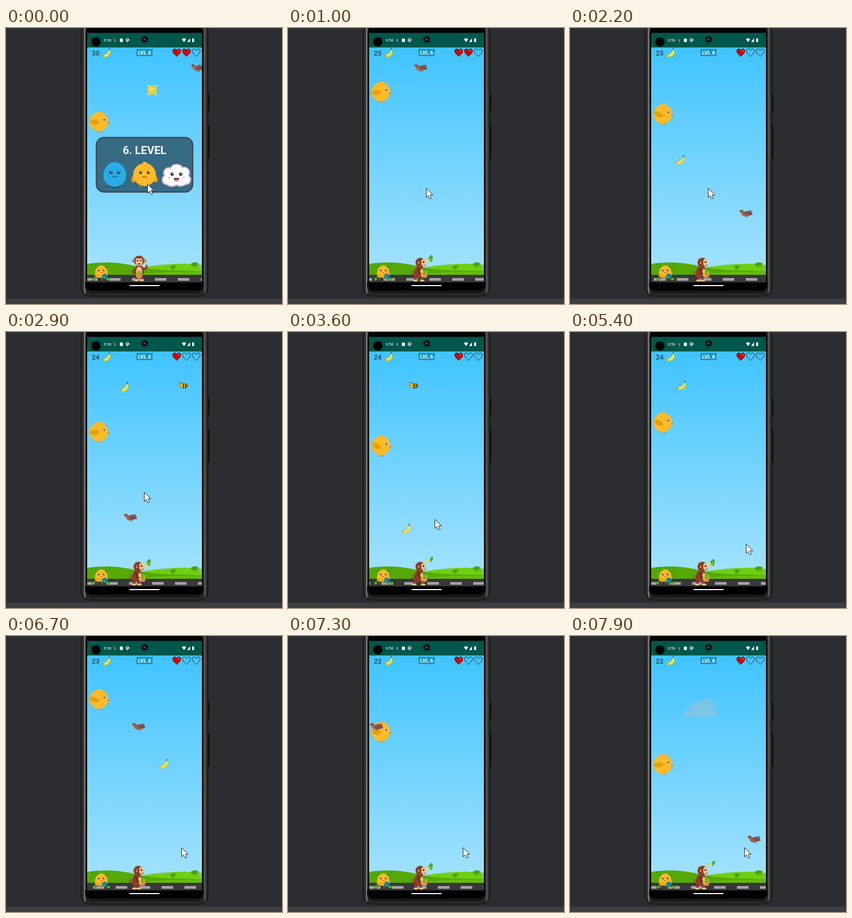
An HTML page with a canvas that plays this animation: 510x510 px, repeating every 8000 ms.

```html
<!DOCTYPE html>
<html lang="en">
<head>
<meta charset="utf-8">
<title>Banana run</title>
<style>
html, body { margin: 0; width: 100%; height: 100%; overflow: hidden; background: #2c2d30; }
canvas { display: block; width: 510px; height: 510px; }
</style>
</head>
<body>
<canvas id="stage"></canvas>
<script>
const LOOP = 8000, STEP = 100;
const canvas = document.getElementById('stage');
const c = canvas.getContext('2d');
const dpr = window.devicePixelRatio || 1;
canvas.width = canvas.height = 510 * dpr;

// ---- helpers ----
function paint(fill, stroke, w = 1) {
  if (fill) { c.fillStyle = fill; c.fill(); }
  if (stroke) { c.strokeStyle = stroke; c.lineWidth = w; c.stroke(); }
}
function oval(x, y, rx, ry, fill, stroke, w, rot = 0) {
  c.beginPath(); c.ellipse(x, y, rx, ry, rot, 0, 7); paint(fill, stroke, w);
}
const dot = (x, y, r, fill, stroke, w) => oval(x, y, r, r, fill, stroke, w);
function box(x, y, w, h, fill, r = 0, stroke, lw) {
  c.beginPath(); c.roundRect(x, y, w, h, r); paint(fill, stroke, lw);
}
function path(d, fill, stroke, w = 1) {
  const p = new Path2D(d);
  c.lineCap = c.lineJoin = 'round';
  if (fill) { c.fillStyle = fill; c.fill(p); }
  if (stroke) { c.strokeStyle = stroke; c.lineWidth = w; c.stroke(p); }
}
function text(s, x, y, size, fill, weight = 700, align = 'center') {
  c.font = `${weight} ${size}px Roboto, sans-serif`;
  c.textAlign = align; c.fillStyle = fill; c.fillText(s, x, y);
}
function at(x, y, draw, rot = 0, scale = 1, alpha = 1) {
  c.save(); c.translate(x, y); c.rotate(rot); c.scale(scale, scale);
  c.globalAlpha *= alpha; draw(); c.restore();
}
function fade(from, to, stops, vertical) {
  const g = vertical ? c.createLinearGradient(0, from, 0, to) : c.createLinearGradient(from, 0, to, 0);
  stops.forEach(([p, col]) => g.addColorStop(p, col));
  return g;
}
// Value of a track of [time, ...values] at time t, linear between keys.
function track(keys, t) {
  const i = keys.findIndex(k => k[0] > t);
  if (i < 0) return keys[keys.length - 1].slice(1);
  if (i === 0) return keys[0].slice(1);
  const a = keys[i - 1], b = keys[i], p = (t - a[0]) / (b[0] - a[0]);
  return a.slice(1).map((v, j) => v + (b[j + 1] - v) * p);
}
const stepped = (keys, t) => keys.filter(k => k[0] <= t).pop()[1];

// ---- timeline ----
const score = [[0, 30], [900, 25], [2700, 24], [6300, 23], [7300, 22]];
const lives = [[0, 2], [1600, 1]];
const chickY = [[0, 173], [200, 173], [1000, 118], [2200, 159], [3600, 210], [5400, 167], [6700, 117], [7900, 237]];
const cursorPos = [[0, 261, 288], [400, 261, 288], [800, 255, 296], [3000, 255, 296], [3600, 271, 346],
  [4000, 276, 350], [4500, 325, 392], [5500, 325, 392], [6700, 324, 391], [7900, 322, 391]];
// Falling bananas: start, end, x and y at both ends, tilt
const bananas = [
  [1810, 2700, 170, 98, 247, 431, 0],
  [2890, 3850, 219, 98, 219, 457, -.12],
  [5390, 6290, 206, 95, 247, 431, 0],
  [6330, 7230, 323, 98, 247, 435, -.12]
];
// Birds fly left: time and place of one known point
const birds = [[1000, 245, 73], [2200, 325, 342], [6700, 245, 167], [7900, 340, 375]];
const FLY = .136;

// ---- sprites ----
function banana() {
  path('M-8 3.5C-3 4 2.5 1 4.5-5L6.5-6C10 1 4 8-4 7.8C-7 7.4-8.5 6-8 3.5Z', '#fddc22', '#e0b010', .4);
  path('M-5 5C0 5 4.5 1.5 6-3', null, '#fff08a', 1);
  path('M5.5-5.5L6.2-8', null, '#55551c', 1.6);
  dot(-7.6, 5, .9, '#6b5a20');
}
function heart(full) {
  path('M0 7C-3 4-7.3 1-7.3-3C-7.3-8-1.5-8 0-4C1.5-8 7.3-8 7.3-3C7.3 1 3 4 0 7Z',
    full ? '#d80000' : null, full ? '#3d0505' : '#12303f', 1);
  if (full) oval(3.8, -3.6, 1.1, 1.5, '#ff6a60');
}
function face(eye, gap) {
  for (const s of [-1, 1]) {
    dot(s * gap, 0, eye, '#222');
    dot(s * gap + .6, -.8, eye * .38, '#fff');
  }
}
function chick(t) {
  const wing = Math.sin(t / 260) * .35;
  path('M-1 17L-2 19.5H0M4 17V19.5H6', null, '#d7831c', 1.1);
  path('M-2-17C0-20 3-20 4-18Q7-18 9-15Z', '#fcb826');
  oval(0, 0, 17.3, 17.7, '#fdba29');
  at(-7, 1, () => path('M-10-3C-5-7 5-5 9 1C5 6-8 7-10-3Z', '#e6a00f'), wing);
  dot(10, -3.5, 2.2, '#fff'); dot(10.2, -3.5, 1.7, '#222'); dot(10.7, -4.1, .6, '#fff');
  path('M16-1L19.5 2L16.5 5Z', '#e58a18');
}
function frontChick() {
  path('M-7 19L-10 24M-7 21L-6 25M7 19L6 24M8 21L11 24', null, '#c96516', 1.6);
  path('M-18-2C-24 3-26 10-23 14C-18 15-15 10-14 7ZM18-2C24 3 26 10 23 14C18 15 15 10 14 7Z', '#e9a010');
  path('M-4-19C-5-24 3-26 6-20Q13-20 11-15Z', '#fdba29');
  dot(0, 0, 21, '#fdba29');
  at(0, -4, () => face(2.5, 7));
  path('M-6 4Q0 0 6 4Q0 9-6 4Z', '#e28417');
}
function egg() {
  path('M-12 20Q-16 25-19 22M-10 21Q0 27 11 21', null, '#2d4550', 1.2);
  path('M0-23C12-23 21-11 21 1C21 15 11 22 0 22C-11 22-21 15-21 1C-21-11-12-23 0-23Z', '#27aee9');
  for (let i = 0; i < 26; i++) {
    const a = i * 2.4, r = 3.5 * Math.sqrt(i);
    dot(Math.cos(a) * r, Math.sin(a) * r, .7, '#1689bd');
  }
  at(0, -4, () => face(2.8, 7));
  path('M-4 3Q0 6 4 3', null, '#174d6a', 1.2);
}
function cloudFriend() {
  path('M-18 17C-27 16-29 5-22 1C-27-8-18-16-11-13C-7-22 7-22 11-14C20-17 27-7 22 1C29 6 26 17 17 17C10 22 4 20 0 18C-6 22-14 21-18 17Z',
    '#fff', '#d6b9dc', 2.4);
  at(0, -2, () => face(3, 8));
  oval(-13, 4, 3, 1.6, '#f7bfd0'); oval(13, 4, 3, 1.6, '#f7bfd0');
  path('M-5 5H5Q4 11 0 11Q-4 11-5 5Z', '#7c3246');
  oval(0, 9, 2.5, 1.5, '#ee7788');
}
function greyCloud() {
  path('M-25 18C-34 16-31 2-19 3C-18-9-5-14 4-11C9-22 24-18 23-5C32-2 34 15 24 17Z', '#a9bec5');
}
function bird(t) {
  const up = Math.floor(t / STEP) % 4 < 2;
  path('M4 1L12-1L11 1L13 3L4 5Z', '#7b4c48');
  path('M-13-3L-9.5-6C-7-7-5-5-3-3Q5-5 9 1C5 8-5 8-8 2Q-9-2-13-3Z', '#a5604f');
  path(up ? 'M-3 2L1-3L5-6L5-3L10-6L9-2L12-3L7 4L1 5Z' : 'M-3-1L4-4L11-5L9-2L12-1L9 1L10 3L2 4Z', '#704a49');
  path('M0 2L8 0M1 0L7-3', null, '#9d6c62', .8);
  path('M-6 4Q-2 7 4 5', null, '#bd735a', 1.3);
  dot(-8.3, -4, .8, '#151515');
  path('M0 6L1 8M3 6L4 8', null, '#6d3d2d', .8);
}
function bee(t) {
  const flap = Math.floor(t / STEP) % 2;
  oval(2, -4, 3, flap ? 2.3 : 1.7, '#cdeaf3', '#4f6a70', .5, .3);
  oval(2, 1, 6.5, 4.6, '#f9c623', '#2a2410', .7);
  path('M1-3V5M5-2.5V4.5', null, '#231e12', 1.9);
  path('M7.5-1L10 1L7.5 3Z', '#231e12');
  dot(-4, 0, 4.3, '#fbcf34', '#5a4a12', .6);
  dot(-5.5, 0, 1.1, '#222'); dot(-2.5, 0, .8, '#222');
  path('M-6-4L-7.5-6M-3-4L-3-6', null, '#222', .8);
}
function coin() {
  for (const x of [-7, 7]) for (const y of [-8, 8]) {
    path(`M${x - 1.5} ${y}H${x + 1.5}M${x} ${y - 1.5}V${y + 1.5}`, null, '#f3f5d0', 1.2);
  }
  dot(0, 0, 8.2, '#f6dc2c', '#e6be22', 1);
  dot(0, 0, 5, '#fbe95f', '#d6b41c', 1);
  path('M-2 1Q0 3 3 0', null, '#c99d12', 1.2);
}
function leaf() { path('M-4 1C-2-4 1-4 4.5-2.5C3 2.5 0 4.5-4 1Z', '#4fc01c', '#1d6a0c', .8); }

function helper(t) {
  const swing = Math.floor(t / 300) % 3 - 1;
  path('M-3-9C-2-13 4-12 5-8Z', '#fdba29');
  path('M-11 10C-14-1-8-11 0-11C8-11 14-1 11 10Q0 13-11 10Z', '#fbb827');
  at(0, -2, () => face(1.5, 4.5));
  path('M-3 2Q0 0 3 2Q0 4-3 2Z', '#df7a17');
  path('M-11 5Q-6 9 2 8', null, '#e39a12', 2);
  dot(6.5, 9, 5, '#1476b8');
  path('M3 8Q6 5 7 9Q8 12 5 13Z', '#36a24b');
  path('M-6 12L-8 15M1 13L2 16', null, '#d5701a', 1.3);
  [[-13, -11, .6], [12, -11, -.3], [-13, 14, -.2], [13, 14, .5]].forEach(([x, y, r]) =>
    at(x + swing * .7, y, leaf, r + swing * .3, .85));
}

const FUR = '#8b3f25', SKIN = '#efc08a';
function basket(x, y) {
  dot(x - 3, y - 4, 2.4, '#f4c92b'); dot(x, y - 5, 2.5, '#55b52c'); dot(x + 3.5, y - 4, 2.3, '#a8c62c');
  path(`M${x - 7} ${y - 2}H${x + 7}L${x + 4} ${y + 6}H${x - 4}Z`, '#dca24c', '#96601f', .7);
  path(`M${x - 5} ${y + 1}H${x + 5}M${x - 2} ${y - 2}V${y + 5}M${x + 2} ${y - 2}V${y + 5}`, null, '#a8712d', .6);
}
function standingMonkey() {
  path('M-4 12L-5 21M4 12L5 21', null, FUR, 5);
  oval(-5, 22, 4, 2, SKIN); oval(5, 22, 4, 2, SKIN);
  oval(0, 5, 9, 11, FUR);
  oval(0, 5, 5.5, 8, SKIN);
  path('M7 0L13 1L14-6', null, FUR, 3.5);
  dot(14, -8, 2.3, SKIN);
  path('M-7 0L-12 6L-6 11', null, FUR, 3.5);
  dot(-9, -14, 3, SKIN, FUR, 1.2); dot(9, -14, 3, SKIN, FUR, 1.2);
  dot(0, -14, 9.5, FUR);
  oval(0, -11, 6.5, 6.5, SKIN); dot(-3, -15, 3.4, SKIN); dot(3, -15, 3.4, SKIN);
  at(0, -14, () => face(1.4, 3));
  path('M-3-9H3Q0-4-3-9Z', '#8a2620');
  basket(0, 12);
}
function runningMonkey(t) {
  const s = Math.sin(t / 550 * 2 * Math.PI + 1) * 2.5;
  path('M-10 11Q-18 13-15 4', null, FUR, 1.4);
  path(`M-7 12L${-9 + s} 20M0 13L${2 - s} 20`, null, FUR, 5);
  oval(-9 + s, 21.5, 4.5, 1.8, SKIN); oval(3 - s, 21.5, 4.5, 1.8, SKIN);
  path('M-5-6C-11 0-15 9-11 15C-6 19 4 17 6 10L4-6Z', FUR);
  oval(3, 6, 3, 6, SKIN);
  oval(0, -11.5, 9, 9, FUR);
  path('M4-18C8-19 10-15 9-12C12-10 12-5 8-4C3-4 1-8 2-12Q1-16 4-18Z', SKIN);
  oval(-3, -11, 2.4, 3, '#c98a5e', '#6c2d1a', .9);
  dot(5.8, -12.5, 1.5, '#222');
  path('M6-6.5Q8-5 10-6.5', null, '#7a2b1c', 1);
  path('M-4 0Q-3 9 3 11', null, '#70301c', 3.4);
  basket(7.5, 10.5);
  dot(3, 11.5, 1.9, SKIN);
}
function fruitToss(t) {
  const p = ((t - 1000) % 1100 + 1100) % 1100;
  if (p > 50 && p < 300) return;
  if (p >= 300 && p < 600) {
    at(252.5, 422.5, banana, 0, .35, .85);
    at(259, 421.5, banana, .7, .45, .85);
    at(265, 419.5, leaf, -.6, .8);
    dot(264, 423, 2, '#58bd54'); dot(262, 418.5, .8, '#bfe9cf');
  } else {
    at(257, 429, banana, 0, .55);
    at(264, 425, leaf, -.7, 1);
    dot(264, 429, 3, '#4bb53a'); dot(263, 428, 1, '#b4e8a0');
  }
}

// ---- scene ----
function phone() {
  c.fillStyle = '#2c2d30'; c.fillRect(0, 0, 510, 510);
  c.fillStyle = '#3c3d41'; c.fillRect(0, 500, 510, 10);
  box(373, 122, 3, 32, '#111', 1); box(373, 180, 3, 61, '#111', 1);
  box(138, -8, 236, 504, '#131313', 18);
  box(139.5, -7, 233, 501.5, fade(140, 372,
    [[0, '#2b2b2b'], [.015, '#303030'], [.02, '#7c7c7c'], [.028, '#6a6a6a'], [.034, '#2a2a2a'],
     [.97, '#2a2a2a'], [.975, '#5a5a5a'], [.985, '#484848'], [1, '#222']]), 17);
  box(146, 470, 220, 21, '#1b1b1b', [0, 0, 13, 13]);
  box(147, -4, 217.5, 490, '#050505', 12);
}
function statusBar() {
  c.fillStyle = '#00574b'; c.fillRect(150, 9, 212, 27);
  dot(166, 25.5, 8.7, '#000');
  dot(256, 21, 6.2, '#111'); dot(256, 21, 2, '#46515a');
  text('6:54', 181, 25, 7, '#fff', 400, 'left');
  path('M202 19.5L200.5 23H203L201.5 26', null, '#cfe3df', .7);
  box(210.5, 19.5, 5.5, 6.5, '#fff', 1.2);
  dot(224.5, 22, 2.8, null, '#fff', 1); path('M222 22H227M224.5 22V26', null, '#fff', .9);
  path('M325 20.5Q329 17.5 333 20.5L329 26Z', '#fff');
  path('M340 19V26H334.5Z', '#fff');
  box(344, 19.5, 3.6, 6.5, '#fff', .7); box(345, 18.7, 1.6, 1.2, '#fff');
}
function tree(x, y, r) {
  path(`M${x} ${y}V${y + 6}`, null, '#50752a', 1);
  dot(x - r * .4, y, r * .8, '#3c9f14'); dot(x + r * .4, y - 1, r * .8, '#48ac18');
}
function land(t) {
  c.fillStyle = fade(36, 440, [[0, '#40c4ff'], [1, '#a0e1fd']], true);
  c.fillRect(150, 36, 212, 425);
  path('M225 448C255 441 290 436 328 435.5Q348 435.5 362 438V457H225Z', '#70ce12');
  path('M150 436C172 432 205 432 235 439Q268 447 305 448Q340 448 362 450V457H150Z', '#56a905');
  path('M232 457Q290 448 362 451V457Z', '#64bd0a');
  tree(309, 442, 4); tree(347, 437, 4); tree(351.5, 437, 3.5);
  c.fillStyle = '#383838'; c.fillRect(150, 456, 212, 14);
  c.fillStyle = '#a3a3a3';
  const gap = 42.4, shift = (275 - .0177 * Math.max(0, t - 210)) % gap;
  for (let x = shift + gap * 2; x < 364; x += gap) c.fillRect(x, 462, 21.5, 5);
}
function hud(t) {
  text(stepped(score, t), 158.5, 51, 12.5, '#2b5368', 700, 'left');
  at(186, 46, banana, -.1, .95);
  box(241, 38.5, 30, 13.5, '#1597c5');
  text('LVL 6', 256, 49, 9.8, '#fff');
  for (let i = 0; i < 3; i++) at(315.5 + 18 * i, 45.5, () => heart(i < stepped(lives, t)));
}
function dialog(alpha) {
  c.save(); c.globalAlpha = alpha;
  box(167, 202.5, 178, 100.5, '#376a83', 14, '#3e4a52', 2.4);
  text('6. LEVEL', 256, 233, 20.3, '#f5f8fa');
  at(201, 271, egg); at(256, 271, frontChick); at(315, 272, cloudFriend);
  c.restore();
}
function cursor(x, y) {
  at(x, y, () => path('M.5 .5V17L4.2 13.5L7 19.5L10 18.2L7.3 12.3H12.2Z', '#fff', '#1d1d1d', 1));
}

function draw(t) {
  c.setTransform(dpr, 0, 0, dpr, 0, 0);
  phone();
  c.save();
  c.beginPath(); c.rect(150, 9, 212, 473); c.clip();
  land(t);
  if (t >= 7500) at(240, 132, greyCloud, 0, 1, .45 * (t - 7400) / 500);
  hud(t);
  at(176, 450, () => helper(t));
  at(171.5, track(chickY, t)[0], () => chick(t));
  birds.forEach(([time, x, y]) => {
    const bx = x - FLY * (Math.max(t, 200) - time);
    if (bx > 135 && bx < 376) at(bx, y, () => bird(t));
  });
  const bx = 232 - FLY * (t - 3600);
  if (bx > 135 && bx < 376) at(bx, 98.5, () => bee(t), 0, .95);
  if (t < 900) at(...track([[200, 270, 115], [1000, 252, 430]], t), coin);
  for (const [t0, t1, x0, y0, x1, y1, tilt] of bananas) {
    if (t >= t0 && t < t1) at(...track([[t0, x0, y0], [t1, x1, y1]], t), banana, tilt);
  }
  if (t < 200) at(246, 444, standingMonkey);
  else {
    at(244.5, 445, () => runningMonkey(t));
    fruitToss(t);
  }
  if (t < 500) dialog(Math.min(1, (500 - t) / 300));
  c.fillStyle = '#000'; c.fillRect(150, 470, 212, 13);
  box(228, 475, 56, 2, '#fff', 1);
  statusBar();
  c.restore();
  cursor(...track(cursorPos, t));
}

const start = performance.now();
function tick(now) {
  const t = Math.max(0, now - start) % LOOP;
  draw(Math.floor(t / STEP) * STEP);
  requestAnimationFrame(tick);
}
draw(0);
requestAnimationFrame(tick);
</script>
</body>
</html>
```
